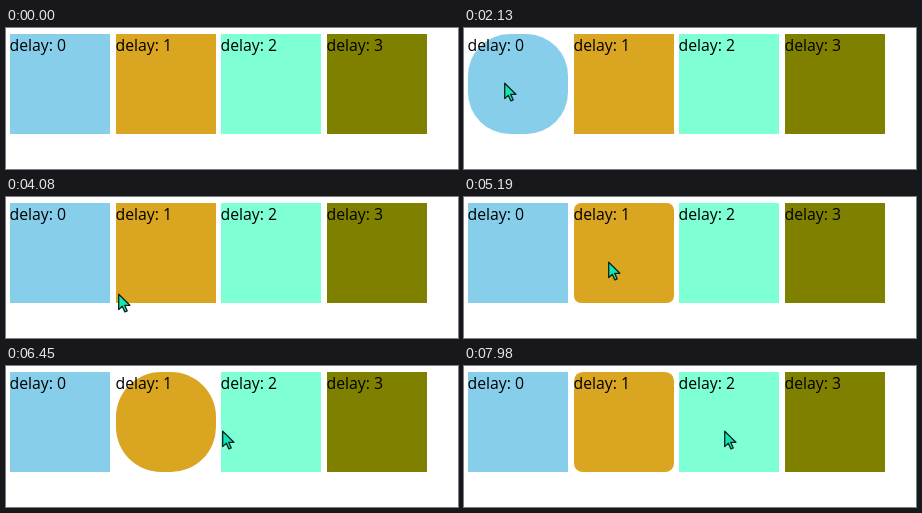
Write an HTML page that moves like this. It is 452 px wide and 141 px high and loops after 8 s.

```html
<!DOCTYPE html>
<html lang="en">
<head>
<meta charset="utf-8">
<title>Transition delay</title>
<style>
  html, body { margin: 0; width: 100%; height: 100%; overflow: hidden; background: #fff; }
  svg { display: block; width: 452px; height: 141px; }
  text { font: 15.8px "Open Sans", "Noto Sans", sans-serif; }
</style>
</head>
<body>
<svg viewBox="0 0 452 141">
  <g id="boxes"></g>
  <path id="cursor" d="M.7 1.2V16.6L4.3 13.2L6.9 18.9L9.2 17.9L6.7 12.3H11.9Z"
    fill="#0fe8b4" stroke="#10201c" stroke-width="1.3" stroke-linejoin="round"/>
</svg>
<script>
const LOOP = 8000;
const SIZE = 100;
const STEP = 105.6;
const RADIUS = 45;
const NS = "http://www.w3.org/2000/svg";
const boxes = document.getElementById("boxes");
const cursor = document.getElementById("cursor");

function add(tag, attrs, text = "") {
  const el = document.createElementNS(NS, tag);
  for (const key in attrs) el.setAttribute(key, attrs[key]);
  el.textContent = text;
  return boxes.appendChild(el);
}

const rects = ["skyblue", "goldenrod", "aquamarine", "olive"].map((fill, i) => {
  const x = 4 + Math.round(i * STEP);
  const rect = add("rect", { x, y: 6, width: SIZE, height: SIZE, fill });
  add("text", { x: x - 0.5, y: 23 }, "delay: " + i);
  return rect;
});

// When the pointer enters and leaves each box; the effect waits i seconds
const hovers = [
  { enter: 1458, leave: 3025 },
  { enter: 4055, leave: 6480 }
];

const first = { time: 1470, x: 0, y: 64 };
const moves = [
  { from: 1470, to: 1830, x: 40, y: 54 },
  { from: 2690, to: 2730, x: 46, y: 54 },
  { from: 2865, to: 3270, x: 46, y: 136 },
  { from: 3660, to: 4080, x: 112, y: 96, linear: true },
  { from: 4080, to: 4350, x: 144, y: 64 },
  { from: 6320, to: 6660, x: 260, y: 64 }
];

const clamp = p => Math.min(1, Math.max(0, p));
const easeOut = p => 1 - (1 - p) ** 2;

// The CSS "ease" curve: cubic-bezier(.25, .1, .25, 1)
function ease(p) {
  p = clamp(p);
  let lo = 0, hi = 1;
  for (let i = 0; i < 24; i++) {
    const s = (lo + hi) / 2;
    if (0.75 * s * (1 - s) + s ** 3 < p) lo = s; else hi = s;
  }
  const q = 1 - lo;
  return 0.3 * q * q * lo + 3 * q * lo * lo + lo ** 3;
}

function pointer(t) {
  let { x, y } = first;
  for (const move of moves) {
    const p = clamp((t - move.from) / (move.to - move.from));
    const k = move.linear ? p : easeOut(p);
    x += (move.x - x) * k;
    y += (move.y - y) * k;
  }
  return [Math.round(x), Math.round(y)];
}

function draw(t) {
  hovers.forEach(({ enter, leave }, i) => {
    const grown = ease((t - enter) / 1000 - i) - ease((t - leave) / 1000 - i);
    rects[i].setAttribute("rx", RADIUS * grown);
  });
  cursor.setAttribute("visibility", t < first.time ? "hidden" : "visible");
  cursor.setAttribute("transform", `translate(${pointer(t)})`);
}

const start = performance.now();
function tick() {
  draw((performance.now() - start) % LOOP);
  requestAnimationFrame(tick);
}
tick();
</script>
</body>
</html>
```
